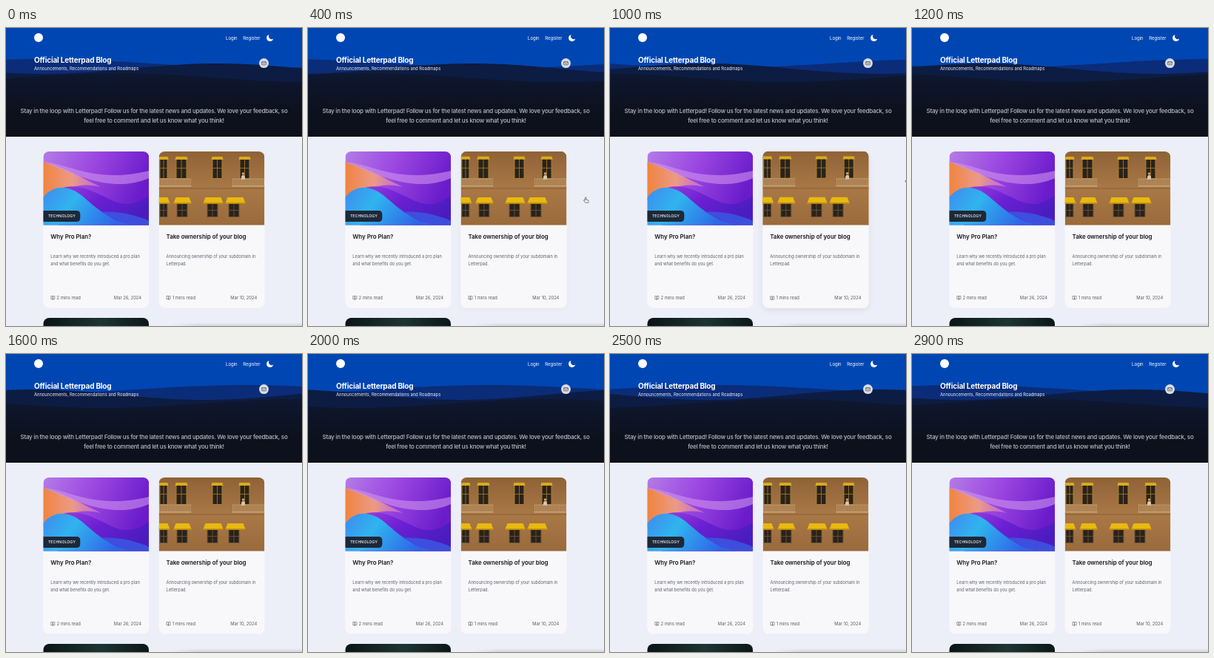
These frames come from a looping animation (400 px wide and 403 px high, 3000 ms). An HTML page:

```html
<!DOCTYPE html>
<html lang="en">
<head>
<meta charset="utf-8">
<title>Blog</title>
<style>
html, body { margin: 0; width: 100%; height: 100%; overflow: hidden; background: #eceff7; }
svg { display: block; width: 400px; height: 403px; font-family: Inter, "Open Sans", sans-serif; }
.title { font-size: 10px; font-weight: 700; letter-spacing: -.2px; fill: #fff; }
.sub { font-size: 5.8px; fill: #eef1f8; }
.nav { font-size: 6px; fill: #fff; }
.intro { font-size: 8px; font-weight: 500; letter-spacing: -.235px; fill: #b9bdc7; text-anchor: middle; }
.head { font-size: 7.9px; font-weight: 600; fill: #14161d; }
.body { font-size: 5.72px; fill: #5c606b; }
.meta { font-size: 5.85px; fill: #595d68; }
.end { text-anchor: end; }
.tag { font-size: 5.3px; font-weight: 500; fill: #f1f4f8; }
</style>
</head>
<body>
<svg viewBox="0 0 400 403">
  <defs>
    <linearGradient id="front" x1="0" y1="62" x2="0" y2="115" gradientUnits="userSpaceOnUse">
      <stop offset="0" stop-color="#0e1730"/><stop offset="1" stop-color="#0d111c"/>
    </linearGradient>
    <linearGradient id="violet" x1="0" y1="0" x2="1" y2=".3">
      <stop offset="0" stop-color="#b47be6"/><stop offset=".5" stop-color="#9a45e0"/>
      <stop offset="1" stop-color="#6a1ccb"/>
    </linearGradient>
    <linearGradient id="flame" x1="0" y1="0" x2="1" y2="0">
      <stop offset="0" stop-color="#f0843f"/><stop offset=".5" stop-color="#ec9a86"/>
      <stop offset="1" stop-color="#b964e2"/>
    </linearGradient>
    <linearGradient id="deep" x1="0" y1="0" x2="1" y2=".5">
      <stop offset="0" stop-color="#9a3fe0"/><stop offset=".5" stop-color="#6a1fd2"/>
      <stop offset="1" stop-color="#4a1cc0"/>
    </linearGradient>
    <linearGradient id="sky" x1="0" y1="0" x2="1" y2=".3">
      <stop offset="0" stop-color="#3f8af0"/><stop offset=".4" stop-color="#30b4ee"/>
      <stop offset="1" stop-color="#2f62e8"/>
    </linearGradient>
    <linearGradient id="wall" x1="0" y1="0" x2="0" y2="1">
      <stop offset="0" stop-color="#8f6237"/><stop offset=".5" stop-color="#a97846"/>
      <stop offset="1" stop-color="#9a6a3c"/>
    </linearGradient>
    <linearGradient id="dusk" x1="0" y1="0" x2="1" y2="0">
      <stop offset="0" stop-color="#0a1416"/><stop offset=".55" stop-color="#1c3533"/>
      <stop offset="1" stop-color="#0c1718"/>
    </linearGradient>
    <linearGradient id="fade" x1="0" y1="0" x2="1" y2="0">
      <stop offset="0" stop-color="#d2d5dc" stop-opacity="0"/><stop offset=".2" stop-color="#d2d5dc"/>
      <stop offset="1" stop-color="#d2d5dc"/>
    </linearGradient>
    <filter id="soft" x="-20%" y="-20%" width="140%" height="140%"><feGaussianBlur stdDeviation="4"/></filter>
    <filter id="haze" x="-10%" y="-100%" width="120%" height="300%"><feGaussianBlur stdDeviation="1.6"/></filter>
    <clipPath id="cardClip"><rect width="143" height="211.5" rx="8"/></clipPath>
    <clipPath id="lastClip"><rect x="50.5" y="392" width="142.5" height="40" rx="8"/></clipPath>
  </defs>

  <rect width="400" height="403" fill="#eceff7"/>
  <rect width="400" height="147" fill="#0046b3"/>
  <g id="waves"></g>

  <circle cx="44" cy="13" r="6" fill="#fff"/>
  <text class="nav" x="297" y="15.7">Login</text>
  <text class="nav" x="320.2" y="15.7">Register</text>
  <path d="M355.6 9A4.6 4.6 0 1 0 361.2 14.6A4.1 4.1 0 0 1 355.6 9Z" fill="#fff"/>
  <text class="title" x="38" y="47">Official Letterpad Blog</text>
  <text class="sub" x="38" y="57">Announcements, Recommendations and Roadmaps</text>
  <circle cx="348.5" cy="47.6" r="6.5" fill="#dadde3"/>
  <g fill="none" stroke="#3d4350" stroke-width=".7">
    <rect x="345.6" y="45.5" width="5.8" height="4.3" rx=".7"/>
    <path d="M345.8 46.2L348.5 48L351.2 46.2"/>
  </g>
  <text class="intro" x="200" y="115">Stay in the loop with Letterpad! Follow us for the latest news and updates. We love your feedback, so</text>
  <text class="intro" x="200" y="127.5">feel free to comment and let us know what you think!</text>

  <rect x="222" y="400.5" width="190" height="8" fill="url(#fade)" filter="url(#haze)"/>
  <g id="cards"></g>
  <g clip-path="url(#lastClip)">
    <rect x="50" y="392" width="143" height="20" fill="url(#dusk)"/>
  </g>

  <g id="hand">
    <path d="M-1.2 -3.2c0-1.2 1.5-1.2 1.5 0V-.6l2.1.5q1.2.3 1 1.5L3 3.3H-.9L-3 .5c-.6-.9.5-1.5 1-.9l.8.8Z" fill="#fff" stroke="#222" stroke-width=".6" stroke-linejoin="round"/>
  </g>
</svg>
<script>
const LOOP = 3000;
const TURN = Math.PI * 2;
const $ = id => document.getElementById(id);
const rect = (x, y, w, h, fill, more = '') =>
  `<rect x="${x}" y="${y}" width="${w}" height="${h}" fill="${fill}" ${more}/>`;
const path = (d, fill, more = '') => `<path d="${d}" fill="${fill}" ${more}/>`;
const text = (cls, x, y, s) => `<text class="${cls}" x="${x}" y="${y}">${s}</text>`;

function abstractArt() {
  return rect(0, 0, 143, 100, 'url(#violet)') +
    path('M0 14C26 20 52 36 78 48C56 42 30 46 0 66Z', 'url(#flame)') +
    path('M0 14C34 16 70 44 143 26V36C100 54 60 40 0 14Z', '#cf93ee', 'opacity=".6"') +
    path('M20 52C50 36 84 66 104 70S130 66 143 60V100H20Z', 'url(#deep)') +
    path('M0 62C14 44 34 46 50 58S84 92 122 100H0Z', 'url(#sky)') +
    path('M78 82C100 80 126 86 143 94V100H114Z', '#3a5be4', 'opacity=".8"');
}

function pane(x, y, w, h, frame) {
  return rect(x - 1, y - 1, w + 2, h + 2, frame) + rect(x, y, w, h, '#2b2219') +
    path(`M${x + w / 2} ${y}v${h}M${x} ${y + h / 2}h${w}`, 'none', `stroke="${frame}" stroke-width=".8"`);
}

function balcony(x, w) {
  let bars = '';
  for (let i = 1; i < w; i += 2.2) bars += `M${(x + i).toFixed(1)} 37v9`;
  return rect(x, 46, w, 1.6, '#c4a47a') +
    path(bars + `M${x} 37h${w}`, 'none', 'stroke="#c9ab82" stroke-width=".6"');
}

function awning(x, w) {
  return path(`M${x + 3} 62h${w - 6}l3 8h${-w}Z`, '#e8b90f') + rect(x, 69, w, 1.8, '#c4930c');
}

function houseArt() {
  const upper = [[2, 9], [24, 13], [73, 12], [110, 12]];
  const lower = [[2, 9], [25, 13], [66, 13], [95, 13]];
  const shades = [[-3, 18], [20, 24], [60, 27], [90, 27]];
  return rect(0, 0, 143, 100, 'url(#wall)') + rect(0, 49, 143, 2, '#8a5c31', 'opacity=".5"') +
    upper.map(([x, w]) => pane(x, 9, w, 27, '#a8802f')).join('') +
    upper.map(([x, w]) => path(`M${x - 1} 7h${w + 2}l1 4h${-w - 4}Z`, '#d9ab1c')).join('') +
    path('M111.5 38v-3q0-3 2.5-3t2.5 3v3Z', '#d9c7b4') + '<circle cx="114" cy="30" r="1.8" fill="#c69a7c"/>' +
    balcony(0, 44) + balcony(99, 44) +
    lower.map(([x, w]) => pane(x, 71, w, 17, '#6f5a41')).join('') +
    shades.map(([x, w]) => awning(x, w)).join('');
}

function card(x, art, head, lines, mins, date, tag) {
  const book = path('M10.5 195.5h1.7q.8 0 .8.8v4q-.3-.6-1-.6h-1.5ZM15.5 195.5h-1.7q-.8 0-.8.8v4q.3-.6 1-.6h1.5Z',
    'none', 'stroke="#595d68" stroke-width=".6"');
  const label = tag ? path('M0 80H45q5 0 5 5v5q0 5-5 5H0Z', '#1d2838') + text('tag', 6.6, 89.4, tag) : '';
  return `<g transform="translate(${x} 167)">
    ${rect(1, 4, 141, 209, '#38405a', 'class="shade" rx="8" opacity="0" filter="url(#soft)"')}
    ${rect(0, 0, 143, 211.5, '#f8f8fa', 'rx="8"')}
    <g clip-path="url(#cardClip)"><svg width="143" height="99.5">${art}</svg>${label}</g>
    ${text('head', 10, 118, head)}
    ${lines.map((s, i) => text('body', 10, 143.8 + i * 9.8, s)).join('')}
    ${book}${text('meta', 18.3, 199.8, mins + ' mins read')}${text('meta end', 132.8, 199.8, date)}
  </g>`;
}

$('cards').innerHTML =
  card(50.3, abstractArt(), 'Why Pro Plan?',
    ['Learn why we recently introduced a pro plan', 'and what benefits do you get.'], 2, 'Mar 26, 2024', 'TECHNOLOGY') +
  '<g id="lift">' + card(206.5, houseArt(), 'Take ownership of your blog',
    ['Announcing ownership of your subdomain in', 'Letterpad.'], 1, 'Mar 10, 2024') + '</g>';

// Swells roll left by one wavelength per loop; peak is the crest's x at the start
const layers = [
  { fill: '#0b2c78', base: 48, swell: 6, length: 600, peak: 45 },
  { fill: '#0d1c42', base: 55, swell: 7, length: 470, peak: 285 },
  { fill: 'url(#front)', base: 67, swell: 6, length: 520, peak: 150 }
];
for (const layer of layers) {
  layer.el = document.createElementNS('http://www.w3.org/2000/svg', 'path');
  layer.el.setAttribute('fill', layer.fill);
  $('waves').append(layer.el);
}

function crest({ base, swell, length, peak }, p) {
  let d = 'M0 147';
  for (let x = 0; x <= 400; x += 8) {
    const y = base - swell * Math.cos(TURN * ((x - peak) / length + p));
    d += `L${x} ${y.toFixed(2)}`;
  }
  return d + 'L400 147Z';
}

const ramp = (t, a, b) => {
  const k = Math.min(1, Math.max(0, (t - a) / (b - a)));
  return k * k * (3 - 2 * k);
};
const shade = $('lift').querySelector('.shade');

function draw(t) {
  for (const layer of layers) layer.el.setAttribute('d', crest(layer, t / LOOP));

  const up = ramp(t, 350, 600) - ramp(t, 850, 1100);
  const s = 1 + .014 * up;
  $('lift').setAttribute('transform', `translate(278 272.75) scale(${s}) translate(-278 -272.75)`);
  shade.setAttribute('opacity', .38 * up);

  const arrive = 1 - ramp(t, 200, 600), leave = ramp(t, 800, 1050);
  $('hand').setAttribute('transform', `translate(${343.5 + 65 * (arrive + leave)} ${220.5 + 25 * arrive - 15 * leave})`);
  $('hand').setAttribute('visibility', t > 200 && t < 1050 ? 'visible' : 'hidden');
}

const start = performance.now();
function tick() {
  draw((performance.now() - start) % LOOP);
  requestAnimationFrame(tick);
}
draw(0);
requestAnimationFrame(tick);
</script>
</body>
</html>
```
